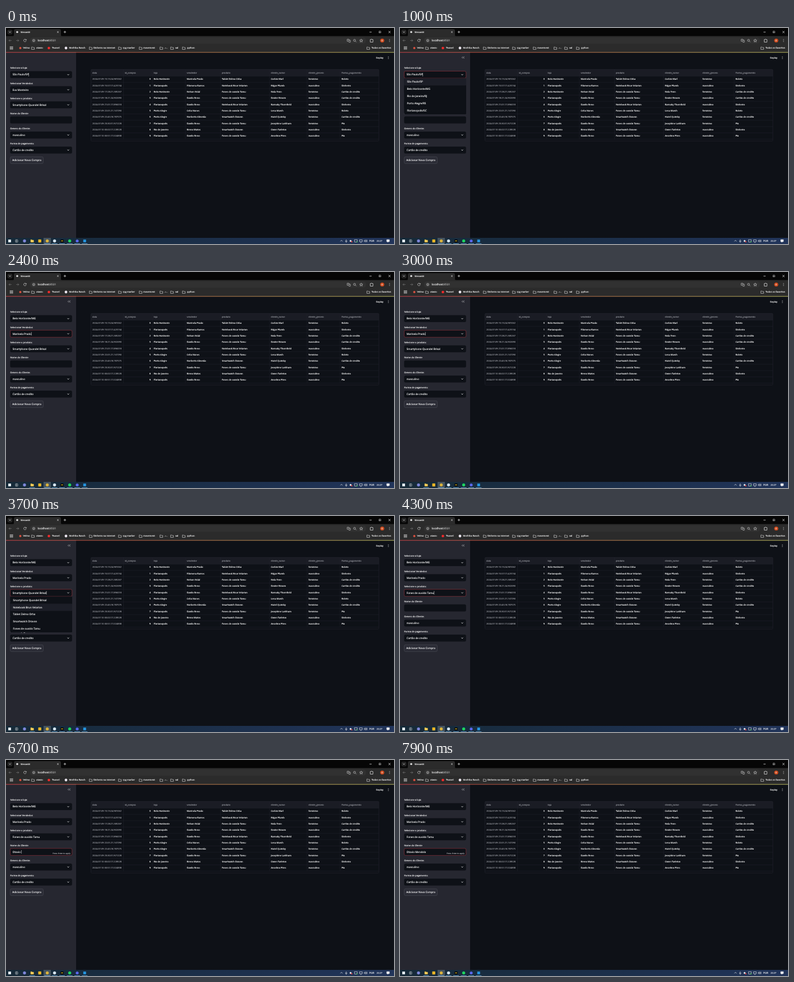
Animation of 692 by 388 pixels, one loop 8 s. Source, as an HTML page:

```html
<!DOCTYPE html>
<html lang="pt">
<head>
<meta charset="utf-8">
<title>Streamlit</title>
<style>
  html, body { margin: 0; width: 100%; height: 100%; overflow: hidden; background: #0e1117; }
  svg { display: block; width: 100vw; height: 100vh; }
  text { font-family: "Open Sans", "Noto Sans", sans-serif; text-rendering: geometricPrecision; white-space: pre; stroke-width: .15px; }
</style>
</head>
<body>
<svg id="stage" viewBox="0 0 692 388">
  <defs>
    <linearGradient id="glow"><stop stop-color="#ff4b4b"/><stop offset="1" stop-color="#fffd80"/></linearGradient>
    <linearGradient id="desk"><stop stop-color="#162a38"/><stop offset="1" stop-color="#21345a"/></linearGradient>
  </defs>
  <g id="fixed"></g>
  <g id="live"></g>
</svg>
<script>
const LOOP = 8000;
const WHITE = '#fafafa', GREY = '#94969d', DARK = '#0e1117', SIDE = '#262730', BAR = '#2b2b2b';
const fixed = document.getElementById('fixed'), live = document.getElementById('live');
let layer = fixed;

function add(tag, attrs) {
  const node = document.createElementNS('http://www.w3.org/2000/svg', tag);
  for (const key in attrs) node.setAttribute(key, attrs[key]);
  return layer.appendChild(node);
}
const rect = (x, y, width, height, fill, rx = 0, more) => add('rect', { x, y, width, height, fill, rx, ...more });
const circle = (cx, cy, r, fill, more) => add('circle', { cx, cy, r, fill, ...more });
const line = (d, stroke = '#d0d0d0', width = .7, more) =>
  add('path', { d, stroke, fill: 'none', 'stroke-width': width, ...more });
// Text is placed by the middle of its line.
function label(str, x, mid, size, fill = WHITE, anchor = 'start') {
  const node = add('text', { x, y: mid + size * .36, 'font-size': size, fill, stroke: fill, 'text-anchor': anchor });
  node.textContent = str;
  return node;
}
const chevron = (x, y, w = 1.5, color = WHITE) => line(`M${x - w} ${y - w / 2}l${w} ${w}l${w} ${-w}`, color, .8);
const ring = (x, y, r, color = '#d0d0d0') => circle(x, y, r, 'none', { stroke: color, 'stroke-width': .7 });
const folder = x => line(`M${x - 2.4} 34.2h1.8l.8 .8h2.4v3.4h-5z`);

function browser() {
  rect(0, 0, 692, 15, '#060606');
  rect(2.5, 3, 9, 8.5, '#242424', 2.5);
  chevron(7, 7.3);
  line('M12 15q2 0 2-2V5q0-3 3-3h78q3 0 3 3v8q0 2 2 2z', 'none', 0, { style: `fill:${BAR}` });
  circle(20, 7.3, 1.7, '#e6e6e6');
  label('Streamlit', 26, 7.3, 4.03);
  line('M91.2 6l2.6 2.6m0-2.6l-2.6 2.6M105 5v4.4m-2.2-2.2h4.4M648.3 7.3h3.8M682.2 5.5l3.6 3.6m0-3.6l-3.6 3.6', WHITE);
  rect(665.4, 5.9, 2.8, 2.8, 'none', 0, { stroke: WHITE, 'stroke-width': .6 });

  rect(0, 14.5, 692, 29, BAR);
  line('M9.8 22.5h-4.6m2-2l-2 2l2 2M18.2 22.5h4.6m-2-2l2 2l-2 2', '#777');
  line('M35.8 21.2a2.3 2.3 0 1 0 .2 2M36.2 20v1.8h-1.8', '#dcdcdc');
  rect(42.5, 16.8, 600, 11.6, '#313131', 5.8);
  circle(49.5, 22.5, 3.8, '#3c3c3c');
  ring(49.5, 22.5, 1.9);
  line('M49.5 22.2v1.3');
  label('localhost', 56.6, 22.5, 4.85);
  label(':8501', 89.2, 22.5, 4.85, '#b4b4b4', 'end');
  line('M608.5 20.2h3v3.6h-3zM611.5 21.8h2.6v3.6h-3M623 23.6l1.8 1.8M633.5 19.8l.8 1.9 2 .2-1.5 1.3.5 2-1.8-1-1.8 1 .5-2-1.5-1.3 2-.2z');
  ring(621.6, 22.2, 1.8);
  line('M649.7 20.7h1.5q.7-2 1.4 0h1.8v1.7q1.6.6 0 1.4v1.6h-4.7z', WHITE);
  circle(671, 22.5, 3.6, '#cf4a1d');
  label('O', 671, 22.5, 3.6, WHITE, 'middle');
  for (const y of [20.6, 22.5, 24.4]) circle(684, y, .5, WHITE);

  for (const x of [7.2, 10.2]) for (const y of [33.6, 36.6])
    rect(x, y, 1.9, 1.9, 'none', 0, { stroke: '#d0d0d0', 'stroke-width': .6 });
  circle(25.5, 36, 2, '#d8503f');
  circle(76.5, 36, 2.3, '#f02b2b');
  circle(107, 36, 2.4, '#e9e4ec');
  [48, 151, 203, 240, 277, 296, 317, 646].forEach(folder);
  const marks = [['Velmo', 30.5], ['otavio', 54], ['Tivanel', 82], ['Mothfox Ranch', 112.5],
    ['Dinheiro na internet', 156], ['rpg marker', 208.5], ['movement', 245], ['.', 287],
    ['val', 302], ['python', 323], ['Todos os favoritos', 652]];
  for (const [name, x] of marks) label(name, x, 36, 4.12);
  line('M283 37l1.6-1.6 1.6 1.6');
}

function table() {
  const edges = [151.5, 209.5, 261, 320, 382.5, 470, 537, 596, 665];
  const top = 74.5, head = 86.4, pitch = 11.33;
  const heads = ['data', 'id_compra', 'loja', 'vendedor', 'produto', 'cliente_nome', 'cliente_genero', 'Forma_pagamento'];
  const BH = 'Belo Horizonte', FL = 'Florianopolis', PA = 'Porto Alegre', DL = 'Danilo Reno';
  const phones = 'Fones de ouvido Tamu', laptop = 'Notebook Brun Velarion', watch = 'Smartwatch Dravon';
  const F = 'feminino', M = 'masculino', card = 'Cartão de credito', cash = 'Dinheiro';
  const rows = [
    ['09 15:13:24.981062', BH, 'Marinela Prado', 'Tablet Zelmo Orba', 'Corbin Marl', F, 'Boleto'],
    ['09 15:57:17.423134', FL, 'Filomena Barros', laptop, 'Edgar Plumb', M, cash],
    ['09 17:28:21.385267', BH, 'Nelson Vidal', phones, 'Nola Fenn', F, card],
    ['09 18:21:24.902690', FL, DL, phones, 'Dexter Broom', M, card],
    ['09 21:01:17.896018', FL, DL, laptop, 'Barnaby Thornfield', M, cash],
    ['09 22:01:21.167290', PA, 'Celia Nunes', phones, 'Lena Marsh', F, 'Boleto'],
    ['09 22:45:18.787575', PA, 'Norberto Almeida', watch, 'Hazel Quimby', F, card],
    ['09 23:30:51.921228', FL, DL, phones, 'Josephine Larkham', F, 'Pix'],
    ['10 00:02:17.228528', 'Rio de Janeiro', 'Breno Matos', watch, 'Owen Tarleton', M, cash],
    ['10 00:51:17.024838', FL, DL, phones, 'Anselmo Pires', M, 'Pix'],
  ];
  const grid = '#252831';
  rect(151.5, top, 513.5, head - top, '#1a1c24');
  heads.forEach((h, i) => label(h, edges[i] + 2.5, 81, 4, GREY));
  rows.forEach(([date, ...cells], r) => {
    const y = 91.9 + r * pitch;
    label('2024-07-' + date, 154, y, 3.96, GREY);
    label(r, 258, y, 4, WHITE, 'end');
    cells.forEach((cell, i) => label(cell, edges[i + 2] + 2.5, y, 4.09));
  });
  for (let r = 0; r <= 10; r++) line(`M151.5 ${head + r * pitch}H665`, grid, .45);
  for (const x of edges.slice(1, -1)) line(`M${x} ${top}V199.7`, grid, .45);
  rect(151.5, top, 513.5, 128.5, 'none', 1.5, { stroke: grid, 'stroke-width': .6 });
}

function taskbar() {
  rect(0, 377, 692, 11, 'url(#desk)');
  rect(67, 377, 13, 11, '#46545f');
  rect(4, 380, 5, 5, '#dfe9f0');
  line('M16.8 380.3h4.4M16.8 384.8h4.4M16.8 381.6h3v2h-3zM21.4 381.5v2.2', '#d8dde0', .6);
  circle(33, 382.5, 2.7, '#7d86d8');
  line('M44 380.2h2l.7.8h2.6v3.8h-5.3z', '#e8b93c', .5, { style: 'fill:#f6cf5c' });
  rect(57.5, 379.8, 5.4, 5.4, '#e8b526', .8);
  circle(73.6, 382.5, 2.7, '#d9b23c');
  circle(86.6, 382.5, 2.7, '#d3e2ee');
  rect(97.2, 380, 5.6, 5, '#050505', .8);
  rect(98.3, 381.8, 3.4, 1.3, '#e5c52d');
  circle(113.6, 382.5, 2.7, '#1ed15e');
  circle(127, 382.5, 2.6, '#5967ee');
  rect(137.8, 380, 5, 5, '#2492db');
  for (const x of [46.6, 73.5, 86.6, 100, 113.6, 127, 140.3]) rect(x - 5, 387.2, 10, .8, '#6fb2e4');

  line('M596.3 383.3l2-2 2 2M606.8 380v3.2m-1.4-1q0 2 1.4 2t1.4-2M606.8 384.2v1.2', WHITE);
  circle(614.6, 382.5, 1.7, '#d9e2e8');
  circle(616.6, 384, 1.2, '#e03a3a');
  rect(621.7, 380.2, 4.6, 4.4, 'none', 0, { stroke: '#d8dde0', 'stroke-width': .7 });
  circle(626, 384.2, 1.1, '#4db85d');
  line('M630.4 380.5h5v3.4h-5zM632 385.2h2M638.8 381.7h1l1.3-1.2v4l-1.3-1.2h-1zM642.3 381q1 1.5 0 3M643.4 380.2q1.6 2.3 0 4.6', WHITE, .6);
  label('POR', 648, 382.5, 4.3);
  label('22:27', 661, 382.5, 3.95);
  line('M679 380.2h4.8v3.6h-2l-1 1.2v-1.2H679z', WHITE, .6, { style: `fill:${WHITE}` });
}

const PITCH = 27.1, boxTop = i => 77.5 + i * PITCH;

function page() {
  rect(0, 43, 692, 334, DARK);
  rect(0, 43, 125, 334, SIDE);
  rect(0, 43.3, 692, 1, 'url(#glow)', 0, { opacity: .75 });
  label('Deploy', 660, 53.3, 4.05);
  for (const y of [51.5, 53.2, 54.9]) circle(682, y, .5, WHITE);
  ['Selecione a loja:', 'Selecionar Vendedor:', 'Selecione o produto:', 'Nome do Cliente', 'Genero do Cliente:', 'Forma de pagamento:']
    .forEach((name, i) => label(name, 7.4, 72 + i * PITCH, 4.15));
  rect(7.5, 231.3, 59, 12.3, '#2b2c36', 2.5, { stroke: '#51525b', 'stroke-width': .5 });
  label('Adicionar Nova Compra', 37, 237.5, 4.67, WHITE, 'middle');
}

const STORES = ['São Paulo/SP', 'Belo Horizonte/MG', 'Rio de Janeiro/RJ', 'Porto Alegre/RS', 'Florianopolis/SC'];
const SELLERS = ['Nelson Vidal', 'Marinela Prado'];
const PRODUCTS = ['Smartphone Quandel Brisal', 'Notebook Brun Velarion', 'Tablet Zelmo Orba', 'Smartwatch Dravon', 'Fones de ouvido Tamu'];
const CLIENT = 'Otavio Mendola';

// Latest value whose start time has been reached.
const at = (t, steps) => steps.reduce((value, [start, next]) => t >= start ? next : value, steps[0][1]);
const between = (t, a, b) => t >= a && t < b;

function menu(field, items, hover) {
  const top = boxTop(field) + 12.9;
  rect(7.3, top, 110.7, items.length * 12.9, DARK, 1.5);
  rect(7.3, top + hover * 12.9, 110.7, 12.9, '#1c1e27', 1);
  items.forEach((item, i) => label(item, 12.5, top + 6.4 + i * 12.9, 4.65));
}

function form(t) {
  const focus = at(t, [[0, -1], [1000, 0], [2100, 1], [3600, 2], [4800, 3]]);
  const typed = at(t, [[0, 0], [5400, 1], [5500, 2], [6300, 4], [6500, 6], [6700, 7], [6900, 8], [7100, 10], [7200, 11], [7300, 13], [7400, 14]]);
  const caretOff = between(t, 1900, 2100) || between(t, 6000, 6300) || t >= 7900;
  const values = [
    at(t, [[0, STORES[0]], [1400, STORES[1]]]),
    at(t, [[0, 'Eva Monteiro'], [1700, SELLERS[0]], [2400, SELLERS[1]]]),
    at(t, [[0, PRODUCTS[0]], [4300, PRODUCTS[4]]]),
    CLIENT.slice(0, typed), 'masculino', 'Cartão de credito',
  ];
  values.forEach((value, i) => {
    const top = boxTop(i), active = i === focus;
    rect(7.4, top, 110.4, 12.6, DARK, 2.5, active ? { stroke: '#a8363f', 'stroke-width': .55 } : {});
    const node = label(value, 11.8, top + 6.3, 4.65);
    if (i !== 3) chevron(111, top + 6.3);
    if ((active || focus < 0 && i === 0) && !caretOff) {
      const x = 12.1 + node.getComputedTextLength();
      line(`M${x} ${top + 3.2}v6.2`, WHITE, .55);
    }
  });
  if (typed) label('Press Enter to apply', 115, 168, 3.45, '#a0a1a7', 'end');
  if (t >= 300) line('M112.2 51.3l-1.7 1.7 1.7 1.7M114.7 51.3l-1.7 1.7 1.7 1.7', '#c8c8cc');

  if (between(t, 1000, 1400)) menu(0, STORES, t < 1100 ? 0 : 1);
  if (between(t, 2100, 2400)) menu(1, SELLERS, t < 2200 ? 0 : 1);
  if (between(t, 3600, 4300)) menu(2, PRODUCTS, Math.min(4, Math.floor((t - 3600) / 100)));
  if (between(t, 4800, 5700)) {
    rect(43.5, 174.5, 54.8, t < 5500 ? 42.5 : 16, '#a2a2a6', 2.5, { opacity: Math.min(1, (t - 4700) / 400) });
    if (t >= 5400) label('o', 47.5, 182.3, 3.6, '#55565c');
  }
}

browser();
page();
table();
taskbar();

layer = live;
let shown = -1;
function frame(now) {
  const t = Math.floor(now % LOOP / 100) * 100;
  if (t !== shown) {
    live.replaceChildren();
    form(t);
    shown = t;
  }
  requestAnimationFrame(frame);
}
frame(performance.now());
</script>
</body>
</html>
```
